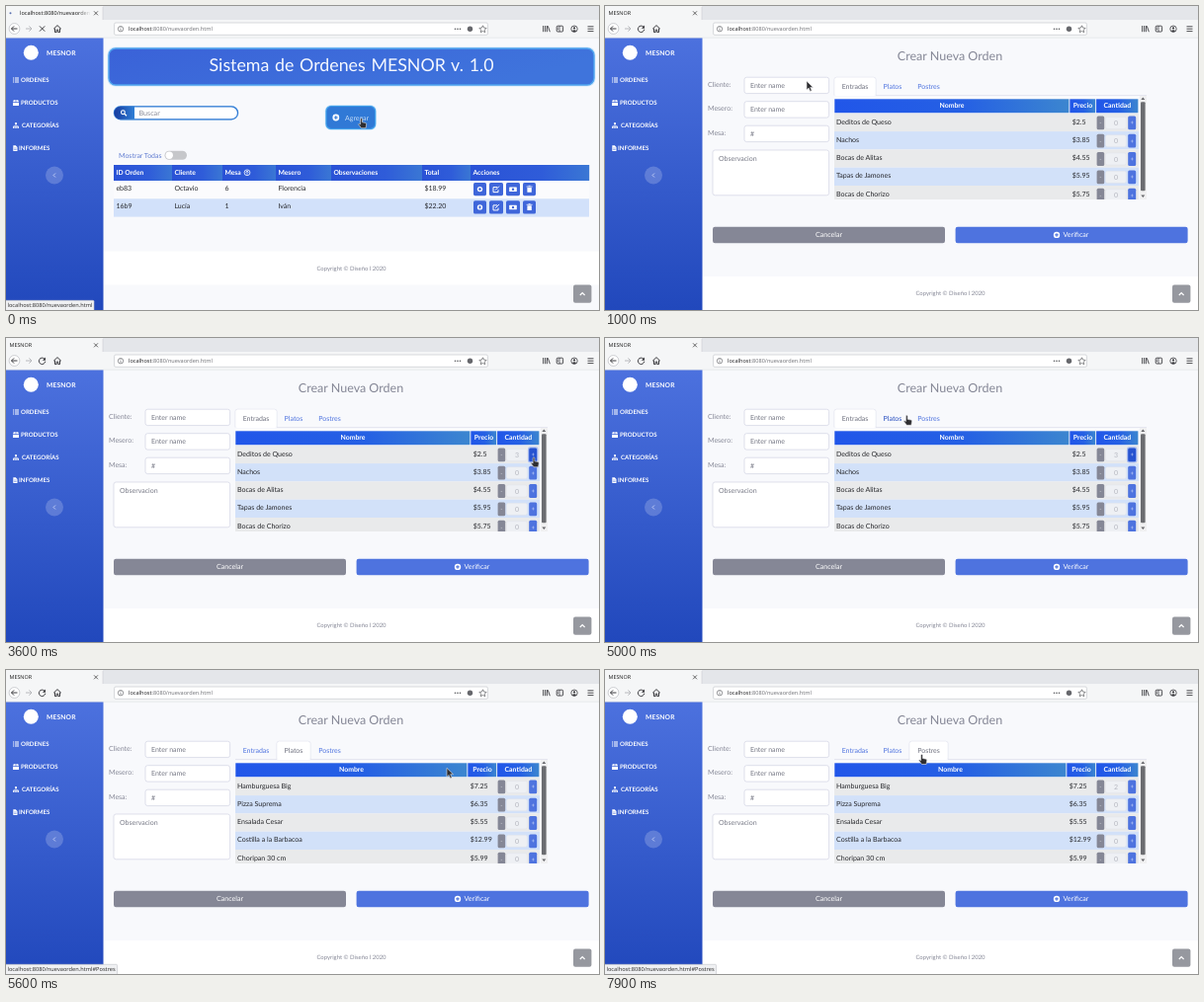
Recreate the animation shown at these times as an HTML page. Size 600 by 308 pixels, loop 8000 ms.

```html
<!DOCTYPE html>
<html lang="es">
<head>
<meta charset="utf-8">
<title>Ordenes</title>
<style>
html, body { margin: 0; width: 100%; height: 100%; overflow: hidden; background: #f8f9fc; }
svg { display: block; width: 100%; height: 100%; }
text { font-family: Lato, "Open Sans", sans-serif; text-rendering: geometricPrecision; white-space: pre; }
text.ui { font-family: "Noto Sans", "Open Sans", sans-serif; }
</style>
</head>
<body>
<svg id="stage" viewBox="0 0 600 308">
  <defs>
    <linearGradient id="side" x2="0" y2="1"><stop stop-color="#4c71de"/><stop offset="1" stop-color="#2148bc"/></linearGradient>
    <linearGradient id="head"><stop stop-color="#2156e9"/><stop offset=".55" stop-color="#2560e4"/><stop offset="1" stop-color="#3c86cf"/></linearGradient>
    <linearGradient id="cell"><stop stop-color="#2a52d6"/><stop offset=".6" stop-color="#2f5cd9"/><stop offset="1" stop-color="#3a77d4"/></linearGradient>
    <linearGradient id="banner" y2=".3"><stop stop-color="#3a62d8"/><stop offset="1" stop-color="#3f74dc"/></linearGradient>
    <linearGradient id="find"><stop stop-color="#173a9e"/><stop offset="1" stop-color="#2f7fd6"/></linearGradient>
    <linearGradient id="fade"><stop stop-color="#f5f6f7" stop-opacity="0"/><stop offset="1" stop-color="#f5f6f7"/></linearGradient>
    <clipPath id="clip"><rect x="232" y="91" width="309" height="105"/></clipPath>
  </defs>
</svg>
<script>
const NS = 'http://www.w3.org/2000/svg';
const BRAND = 'MESNOR';
const BLUE = '#4e73df', GRAY = '#858796', INK = '#26272b', HINT = '#757784';
const stage = document.getElementById('stage');

function add(parent, tag, attrs = {}, content) {
  const node = document.createElementNS(NS, tag);
  for (const key in attrs) node.setAttribute(key, attrs[key]);
  if (content !== undefined) node.textContent = content;
  return parent.appendChild(node);
}
const group = (p, attrs) => add(p, 'g', attrs);
const rect = (p, x, y, width, height, fill, rx = 0, more) =>
  add(p, 'rect', { x, y, width, height, fill, rx, ...more });
const disc = (p, cx, cy, r, fill, more) => add(p, 'circle', { cx, cy, r, fill, ...more });
const line = (p, d, stroke, width = 1, more) =>
  add(p, 'path', { d, stroke, 'stroke-width': width, fill: 'none', ...more });
const shape = (p, d, fill, more) => add(p, 'path', { d, fill, ...more });
// y is the middle of the capitals
const label = (p, x, y, str, size, fill, more) =>
  add(p, 'text', { x, y: y + size * 0.36, 'font-size': size, fill, ...more }, str);
const mid = { 'text-anchor': 'middle' };
const bold = { 'font-weight': 700 };
const ui = { class: 'ui' };
const show = (node, on) => node.setAttribute('visibility', on ? 'visible' : 'hidden');

function plusDisc(p, x, y, r, fill, mark) {
  disc(p, x, y, r, fill);
  line(p, `M${x - r * .55} ${y}h${r * 1.1}M${x} ${y - r * .55}v${r * 1.1}`, mark, r * .35);
}

function browser(p) {
  rect(p, 0, 0, 600, 14, '#e4e6ea');
  rect(p, 0, 0, 98, 14, '#f5f6f7');
  rect(p, 0, 14, 600, 18.5, '#f5f6f7');
  line(p, 'M98 1v13', '#c9cbd0', .6);
  line(p, 'M0 32.3h600', '#cfd1d6', .6);
  line(p, 'M89 5.3l4 4m0 -4l-4 4', '#444', .8);
  disc(p, 8.5, 23, 5.4, '#fff', { stroke: '#b9bbc0', 'stroke-width': .7 });
  line(p, 'M11.5 23h-6m2.6 -2.6l-2.6 2.6l2.6 2.6', '#3c3c40', 1);
  line(p, 'M20 23h6m-2.6 -2.6l2.6 2.6l-2.6 2.6', '#b7b8bc', 1);
  line(p, 'M48.2 23.2l3.8 -3.6l3.8 3.6M49.5 22.6v4h1.7v-2.5h1.6v2.5h1.7v-4', '#3c3c40', 1);
  rect(p, 109.5, 17, 378, 12.3, '#fff', 1.5, { stroke: '#c8cacf', 'stroke-width': .7 });
  disc(p, 116, 23.2, 2.7, 'none', { stroke: '#66676c', 'stroke-width': .7 });
  line(p, 'M116 22.7v2.1M116 21.3v.7', '#66676c', .7);
  label(p, 124, 23, 'localhost', 5.57, '#2b2b2e', ui);
  label(p, 147.6, 23, ':8080/nuevaorden.html', 5.57, '#77787d', ui);
  for (const x of [454.5, 457, 459.5]) disc(p, x, 23.2, .8, '#55565a');
  disc(p, 469.5, 23.2, 2.7, '#66676c');
  shape(p, 'M482.5 19.8l1.1 2.3l2.5 .3l-1.8 1.8l.4 2.5l-2.2 -1.2l-2.2 1.2l.4 -2.5l-1.8 -1.8l2.5 -.3z', 'none', { stroke: '#55565a', 'stroke-width': .7 });
  line(p, 'M543.6 20v6.2M545.6 20v6.2M547.4 20v6.2M548.3 20.3l2 5.9', '#3c3c40', .9);
  rect(p, 557.2, 20.2, 6.4, 5.8, 'none', 1, { stroke: '#3c3c40', 'stroke-width': .9 });
  line(p, 'M560 20.2v5.8M558 22h1.2M558 23.6h1.2', '#3c3c40', .7);
  disc(p, 575, 23.2, 3.2, 'none', { stroke: '#3c3c40', 'stroke-width': .8 });
  disc(p, 575, 22.4, 1.1, '#3c3c40');
  shape(p, 'M572.8 25.2q2.2 -2 4.4 0q-2.2 2 -4.4 0z', '#3c3c40');
  line(p, 'M588.5 20.8h6M588.5 23.2h6M588.5 25.6h6', '#3c3c40', .9);
}

function sidebar(p) {
  rect(p, 0, 32.5, 98.5, 275.5, 'url(#side)');
  disc(p, 25.3, 47.3, 7.5, '#fff');
  label(p, 41, 47.5, BRAND, 6.7, '#fff', { ...bold, 'letter-spacing': .15 });
  const items = [[15, 75, 'ORDENES'], [15, 98, 'PRODUCTOS'], [16, 121, 'CATEGORÍAS'], [13, 144, 'INFORMES']];
  for (const [x, y, name] of items) label(p, x, y, name, 6.1, '#fff', bold);
  line(p, 'M7 73h1.2M7 75h1.2M7 77h1.2M9 73h4M9 75h4M9 77h4', '#fff', 1.1);
  shape(p, 'M7 97.3l.8 -2h1.9v2zM10.3 95.3h1.9l.8 2h-2.7zM7 98h6v3h-6z', '#fff');
  line(p, 'M10 119v2.6M7.8 123v-1.4h4.4v1.4', '#fff', .6);
  rect(p, 9, 118.2, 2, 1.8, '#fff');
  for (const x of [7, 9.2, 11.4]) rect(p, x, 122.2, 1.6, 1.6, '#fff');
  shape(p, 'M7.3 141.2h2.5l1.7 1.7v4.2h-4.2z', '#fff');
  line(p, 'M8.2 144h2.4M8.2 145.5h2.4', '#3f64d2', .5);
  disc(p, 49, 171.5, 9, '#fff', { 'fill-opacity': .2 });
  line(p, 'M50 169.5l-2 2l2 2', '#c8d3f5', .9);
}

function footer(p, y) {
  rect(p, 98.5, y, 501.5, 34, '#fff');
  label(p, 349.5, y + 17, 'Copyright © Diseño l 2020', 5.95, GRAY, mid);
}

function orders(p) {
  rect(p, 98.5, 32.5, 501.5, 276, '#f8f9fc');
  footer(p, 248.5);
  rect(p, 102.5, 41.5, 494, 40, '#cfe6fb', 8);
  rect(p, 104, 43, 491, 37, 'url(#banner)', 7, { stroke: '#4da3ee', 'stroke-width': 1.4 });
  label(p, 349.5, 60, `Sistema de Ordenes ${BRAND} v. 1.0`, 17.8, '#f5f8ff', { ...mid, 'word-spacing': 1.2 });

  rect(p, 108.5, 101, 127, 14.5, '#b9d9f6', 7.2);
  rect(p, 109.5, 101.8, 125, 13, '#fff', 6.5, { stroke: '#2f7ad4', 'stroke-width': 1.2 });
  shape(p, 'M130 101.8v13h-14a6.5 6.5 0 0 1 0 -13z', 'url(#find)');
  disc(p, 118.4, 107.7, 1.9, 'none', { stroke: '#fff', 'stroke-width': 1.1 });
  line(p, 'M119.8 109.1l2.2 2.2', '#fff', 1.3);
  label(p, 134.5, 108.2, 'Buscar', 7.2, '#8a8c99');

  rect(p, 322.8, 100.3, 52, 25.4, '#bfe0fa', 6);
  rect(p, 324, 101.5, 49.6, 23, '#3079d6', 5, { stroke: '#3f9fea', 'stroke-width': 1.2 });
  plusDisc(p, 333.8, 113, 3.4, '#fff', '#3079d6');
  label(p, 343, 113, 'Agregar', 7, '#c5dcf6');

  label(p, 114, 151.8, 'Mostrar Todas', 7, '#5f7bd0');
  rect(p, 160.5, 146.8, 22.5, 9, '#c6c7ca', 4.5);
  disc(p, 165.2, 151.3, 3.7, '#fff');

  const cols = [109, 168, 219, 273, 329, 421, 470, 590];
  const names = ['ID Orden', 'Cliente', 'Mesa', 'Mesero', 'Observaciones', 'Total', 'Acciones'];
  names.forEach((name, i) => {
    rect(p, cols[i], 161, cols[i + 1] - cols[i] + .2, 16, 'url(#cell)');
    label(p, cols[i] + 2.4, 168.8, name, 6.8, '#fff', bold);
  });
  disc(p, 244, 168.8, 2.9, 'none', { stroke: '#fff', 'stroke-width': .8 });
  line(p, 'M244 170.7v-3.6m-1.5 1.5l1.5 -1.5l1.5 1.5', '#fff', .8);

  const rows = [['eb83', 'Octavio', '6', 'Florencia', '', '$18.99'], ['16b9', 'Lucía', '1', 'Iván', '', '$22.20']];
  rows.forEach((row, r) => {
    const y = 177 + r * 18.3;
    rect(p, 109, y, 481, 18.3, r ? '#d2e1fa' : '#fbfbfd');
    row.forEach((str, i) => label(p, cols[i] + 2.4, y + 7, str, 7, INK));
    for (const x of [473, 489, 506, 523]) rect(p, x, y + 2, x === 489 || x === 506 ? 14 : 13, 13.2, '#3f66da', 1.6);
    const c = y + 8.6;
    plusDisc(p, 479.5, c, 2.7, '#fff', '#3f66da');
    line(p, `M497 ${c - 2}h-4v5h5v-2.4M495 ${c + 1}l4 -4`, '#fff', 1);
    rect(p, 509.2, c - 2.2, 7.6, 4.6, '#fff', .5);
    disc(p, 513, c + .1, 1.2, '#3f66da');
    rect(p, 527.4, c - 1.7, 4.4, 4.8, '#fff', .5);
    line(p, `M526.6 ${c - 2.6}h6M528.6 ${c - 3.3}h2`, '#fff', .8);
  });
}

function button(p, x, fill, name, cx) {
  rect(p, x, 223.7, 235, 16.6, fill, 2.2);
  label(p, cx, 231.8, name, 7.1, '#fff', mid);
}

function form(p) {
  rect(p, 98.5, 32.5, 501.5, 276, '#f8f9fc');
  footer(p, 274);
  label(p, 349, 50.3, 'Crear Nueva Orden', 12.5, GRAY, mid);
  const edge = { stroke: '#d1d3e2', 'stroke-width': .7 };
  [['Cliente:', 'Enter name'], ['Mesero:', 'Enter name'], ['Mesa:', '#']].forEach(([name, hint], i) => {
    const y = 72.2 + i * 24.5;
    label(p, 104, y + 6.8, name, 7, GRAY);
    rect(p, 141, y, 85.6, 16.4, '#fff', 2.3, edge);
    label(p, 147, y + 8.2, hint, 7, HINT);
  });
  rect(p, 109, 146, 117.6, 45.8, '#fff', 2.3, edge);
  label(p, 115, 154.2, 'Observacion', 7, HINT);
  button(p, 109, GRAY, 'Cancelar', 226.5);
  button(p, 354.6, BLUE, 'Verificar', 476.5);
  plusDisc(p, 457, 231.9, 3.2, '#fff', BLUE);
}

const TABS = [['Entradas', 232, 274], ['Platos', 274, 308], ['Postres', 308, 347]];
function makeTabs(p) {
  return TABS.map(([name, a, b]) => {
    const on = group(p);
    line(on, `M232 90.5H${a}V74.5q0 -2.3 2.3 -2.3H${b - 2.3}q2.3 0 2.3 2.3V90.5H548`, '#dddfeb', .7);
    rect(on, a + .4, 72.6, b - a - .8, 18.3, '#fff', 2);
    return { on, text: label(p, (a + b) / 2, 81, name, 7, BLUE, mid) };
  });
}

function menu(p, split, rows) {
  const g = group(p, { 'clip-path': 'url(#clip)' });
  [['Nombre', 232, split], ['Precio', split, 496.8], ['Cantidad', 496.8, 540]].forEach(([name, a, b]) => {
    rect(g, a + .3, 94.3, b - a - .9, 14, 'url(#head)');
    label(g, (a + b) / 2, 101, name, 6.9, '#fff', { ...mid, ...bold });
  });
  const counts = rows.map(([name, price], i) => {
    const y = 108.8 + i * 18.3;
    rect(g, 232, y, 308, 18.3, i % 2 ? '#d2e1f9' : '#e9eaeb');
    label(g, 234, y + 8.2, name, 7.05, INK);
    label(g, split + 2.7, y + 8.2, price, 7.05, INK);
    rect(g, 497.6, y + 2.7, 7.6, 13.8, GRAY, 1.5);
    label(g, 501.4, y + 9.4, '-', 6, '#d8d9df', mid);
    rect(g, 506.4, y + 3.6, 21, 12, '#eef0f4', 2, { stroke: '#dfe1e8', 'stroke-width': .5 });
    rect(g, 529.2, y + 2.7, 8, 13.8, BLUE, 1.5);
    label(g, 533.2, y + 9.4, '+', 6, '#d5defa', mid);
    return label(g, 517, y + 9.6, '0', 7, '#b4b6bf', mid);
  });
  const glow = group(g);
  rect(glow, 528, 110.3, 10.4, 16.2, '#a9bdf2', 2.2);
  rect(glow, 529.2, 111.5, 8, 13.8, '#2653d0', 1.5);
  label(glow, 533.2, 118.2, '+', 6, '#d5defa', mid);
  return { g, glow, count: counts[0] };
}

function scrollbar(p) {
  rect(p, 541, 91, 7, 105, '#f0f0f1');
  rect(p, 542, 97.3, 4.6, 90, '#6b6c70', 1);
  shape(p, 'M542.3 95l2 -2.4l2 2.4zM542.3 191.5l2 2.4l2 -2.4z', '#66676b');
}

browser(stage);
const loadTitle = group(stage), pageTitle = group(stage);
disc(loadTitle, 4.5, 7.2, 1, '#5a6fb0');
label(loadTitle, 14, 7, 'localhost:8080/nuevaorden', 5.57, '#222', ui);
rect(loadTitle, 72, 1, 14, 12, 'url(#fade)');
const burst = rect(pageTitle, 0, .5, 22, 13, '#7fc0f7');
label(pageTitle, 3.5, 7, BRAND, 5.4, '#222', ui);
const stop = line(stage, 'M34 20.4l5.2 5.2m0 -5.2l-5.2 5.2', '#3c3c40', 1);
const reload = group(stage);
line(reload, 'M39 21.3a3.2 3.2 0 1 0 .7 2.4', '#3c3c40', 1);
shape(reload, 'M40 19.5v3.2h-3.2z', '#3c3c40');

const list = group(stage), order = group(stage);
orders(list);
form(order);
const tabs = makeTabs(order);
const menus = [
  menu(order, 470, [['Deditos de Queso', '$2.5'], ['Nachos', '$3.85'], ['Bocas de Alitas', '$4.55'], ['Tapas de Jamones', '$5.95'], ['Bocas de Chorizo', '$5.75']]),
  menu(order, 467, [['Hamburguesa Big', '$7.25'], ['Pizza Suprema', '$6.35'], ['Ensalada Cesar', '$5.55'], ['Costilla a la Barbacoa', '$12.99'], ['Choripan 30 cm', '$5.99']])
];
scrollbar(order);
sidebar(stage);

rect(stage, 574, 282.5, 18.4, 18.2, '#96989f', 2);
line(stage, 'M580.8 293l2.4 -2.4l2.4 2.4', '#fff', 1.2);

const status = group(stage);
const statusBox = rect(status, -1, 298.3, 90, 11, '#f0f1f3', 1, { stroke: '#bfc1c6', 'stroke-width': .6 });
const statusText = label(status, 1.5, 303.4, '', 5.65, '#333', ui);

const pointer = group(stage);
const outline = { stroke: '#e8e8ea', 'stroke-width': .6, 'stroke-linejoin': 'round' };
const arrow = shape(pointer, 'M0 0v9l2.1 -1.9l1.5 3.3l1.6 -.8l-1.5 -3.2h2.8z', '#2d2d30', outline);
const hand = shape(pointer, 'M-.9 .6q.9 -1.2 1.8 0v3.4l3.4 .7q1 .3 .9 1.4l-.6 3.9h-4.6l-3 -3.9q.4 -1.2 2.1 .1z', '#2d2d30', outline);

// time, x, y
const PATH = [
  [0, 359.5, 113.7], [400, 359.5, 113.7], [900, 212, 96], [1000, 204, 76],
  [1300, 300, 215], [1400, 440, 221], [1600, 526, 118], [1800, 304, 82],
  [1900, 360.5, 97.3], [2200, 420, 221], [2500, 536, 160], [2700, 533.5, 120.5],
  [3600, 534, 120.8], [4500, 360, 96], [4900, 306, 78], [5200, 304, 79],
  [5400, 330, 82], [5600, 446, 99.3], [5900, 533, 119], [6400, 533, 119],
  [6600, 480, 172], [6900, 358, 140], [7400, 298, 82], [7700, 300, 84],
  [7900, 320.5, 85.5], [8000, 320.5, 85.5]
];
// spans over links and buttons
const OVER = [[0, 100], [1800, 2000], [2700, 3700], [4900, 5500], [5900, 6500], [7400, 8000]];
const COUNTS = [[[2900, 1], [3200, 2], [3500, 3]], [[6100, 1], [6300, 2]]];
const LINKS = [[0, ''], [100, null], [5200, '#Platos'], [5400, '#Postres'], [5900, null], [7500, '#Platos'], [7900, '#Postres']];

const last = (steps, t, start) => steps.reduce((v, [at, value]) => t >= at ? value : v, start);

function movePointer(t) {
  const i = PATH.findIndex(s => s[0] > t);
  const [t0, x0, y0] = PATH[i - 1], [t1, x1, y1] = PATH[i];
  const k = (t - t0) / (t1 - t0);
  pointer.setAttribute('transform', `translate(${x0 + (x1 - x0) * k} ${y0 + (y1 - y0) * k})`);
  const over = OVER.some(([a, b]) => t >= a && t < b);
  show(hand, over);
  show(arrow, !over);
}

function draw(time) {
  const t = Math.floor(time % 8000 / 100) * 100;
  const loaded = t >= 100;
  for (const node of [list, loadTitle]) node.style.display = loaded ? 'none' : '';
  for (const node of [order, pageTitle]) node.style.display = loaded ? '' : 'none';
  burst.setAttribute('opacity', Math.max(0, t < 200 ? .3 : .65 - (t - 200) / 400));
  show(stop, t < 400);
  show(reload, t >= 400);

  const tab = t >= 7900 ? 2 : t >= 5200 ? 1 : 0;
  const hover = t >= 1800 && t < 2000 || t >= 4800 && t < 5200;
  tabs.forEach(({ on, text }, i) => {
    show(on, i === tab);
    text.setAttribute('fill', i === tab ? '#6e707e' : i === 1 && hover ? '#224abe' : BLUE);
  });
  const page = t >= 5200 ? 1 : 0;
  menus.forEach(({ g, glow, count }, i) => {
    g.style.display = i === page ? '' : 'none';
    const n = last(COUNTS[i], t, 0);
    count.textContent = n;
    glow.style.display = n && t < 7900 ? '' : 'none';
  });

  const link = last(LINKS, t, null);
  show(status, link !== null);
  if (link !== null) {
    statusText.textContent = 'localhost:8080/nuevaorden.html' + link;
    statusBox.setAttribute('width', link ? link === '#Postres' ? 113.5 : 110 : 90);
  }
  movePointer(t);
}

const start = performance.now();
function tick() {
  draw(performance.now() - start);
  requestAnimationFrame(tick);
}
tick();
</script>
</body>
</html>
```
